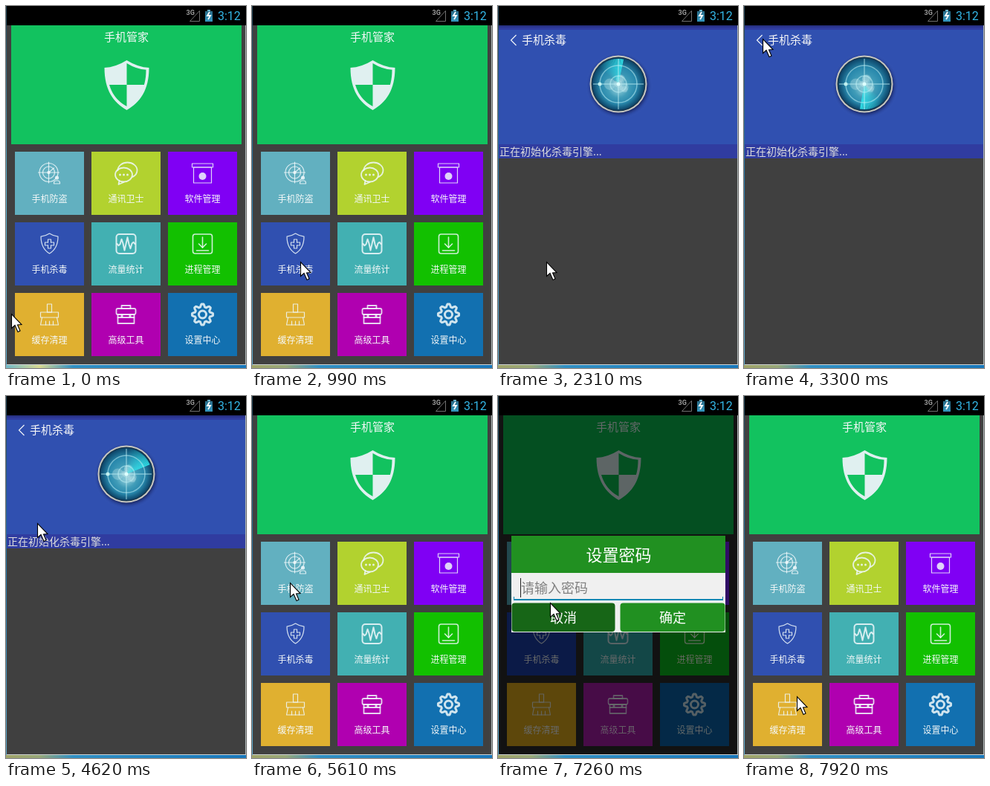
Write an HTML page with a canvas that moves like this. It is 323 px wide and 487 px high and loops after 8000 ms.

```html
<!DOCTYPE html>
<html lang="zh-CN">
<head>
<meta charset="utf-8">
<style>
html, body { margin: 0; width: 100%; height: 100%; overflow: hidden; background: #404040; }
canvas { display: block; }
</style>
</head>
<body>
<canvas id="stage" width="323" height="487"></canvas>
<script>
const c = document.getElementById('stage').getContext('2d');
const LOOP = 8000, TICK = 330, TAU = Math.PI * 2;
const CJK = '"Noto Sans CJK SC", "Noto Sans CJK", sans-serif';
const LATIN = 'Roboto, sans-serif';
const INK = 'rgba(240,248,250,.85)';
const GREEN = '#12c25f', BUTTON = '#219021';

const SCAN = 1320, SWEEP = 2310, BACK = 4950, ASK = 6600, CANCEL = 7260, CLOSE = 7590;

// The pointer rests at each stop, then glides to the next.
const STOPS = [
  { at: 0, until: 0, x: 7, y: 414 },
  { at: 660, until: SWEEP, x: 65, y: 344 },
  { at: 2970, until: 4290, x: 25, y: 44 },
  { at: 4620, until: 4620, x: 42, y: 171 },
  { at: BACK, until: BACK, x: 46, y: 251 },
  { at: 5610, until: ASK, x: 51, y: 251 },
  { at: 6930, until: CLOSE, x: 70, y: 278 },
  { at: 7920, until: LOOP, x: 71, y: 404 }
];

function seeded(seed) {
  return () => (seed = seed * 16807 % 2147483647) / 2147483647;
}

function rect(x, y, w, h, fill) {
  c.fillStyle = fill;
  c.fillRect(x, y, w, h);
}

function blend(x0, y0, x1, y1, ...colors) {
  const g = c.createLinearGradient(x0, y0, x1, y1);
  colors.forEach((color, i) => g.addColorStop(i / (colors.length - 1), color));
  return g;
}

function text(s, x, y, size, fill = '#f4f8f8', align = 'center', font = CJK, weight = 500) {
  c.font = `${weight} ${size}px ${font}`;
  c.textAlign = align;
  c.fillStyle = fill;
  c.fillText(s, x, y);
}

function trace(points, closed) {
  c.beginPath();
  for (const [x, y] of points) c.lineTo(x, y);
  if (closed) c.closePath();
}

function line(...points) {
  trace(points);
  c.stroke();
}

function ring(x, y, rx, ry = rx, from = 0, to = TAU) {
  c.beginPath();
  c.ellipse(x, y, rx, ry, 0, from, to);
  c.stroke();
}

function dot(x, y, r, fill = INK) {
  c.beginPath();
  c.arc(x, y, r, 0, TAU);
  c.fillStyle = fill;
  c.fill();
}

function frameBox(x, y, w, h, r = 0) {
  c.beginPath();
  c.roundRect(x, y, w, h, r);
  c.stroke();
}

function shield(w, h) {
  c.beginPath();
  c.moveTo(0, 0);
  c.quadraticCurveTo(w * .5, h * .14, w, h * .15);
  c.bezierCurveTo(w, h * .6, w * .6, h * .85, 0, h);
  c.bezierCurveTo(-w * .6, h * .85, -w, h * .6, -w, h * .15);
  c.quadraticCurveTo(-w * .5, h * .14, 0, 0);
  c.closePath();
}

// Icons are drawn around their own centre.
const icons = {
  target() {
    for (const r of [8, 12.5]) ring(-1, -1, r);
    line([-15, -1], [13, -1]);
    line([-1, -15], [-1, 13]);
    line([-1, -1], [6, -7]);
    dot(-1, -1, 2.2);
    dot(10, 6, 2.6);
    frameBox(6, 10, 8, 4, [3, 3, 0, 0]);
  },
  chat() {
    c.lineWidth = 1.8;
    ring(2, -4, 13, 10.5, Math.PI, TAU + 1);
    ring(-3, 2, 11.5, 9.5);
    line([-9, 10], [-10, 15], [-3, 12]);
    for (let i = -1; i <= 1; i++) dot(i * 5 - 3, 2, 1.5);
  },
  apps() {
    frameBox(-14, -13, 28, 5);
    frameBox(-12, -8, 24, 21);
    dot(0, 4, 5);
  },
  guard() {
    c.translate(0, -14);
    shield(11.5, 27);
    c.stroke();
    c.translate(0, 14);
    for (let i = 0; i < 4; i++) {
      line([-2, -2], [-2, -6], [2, -6], [2, -2]);
      c.rotate(TAU / 4);
    }
  },
  pulse() {
    c.lineWidth = 2;
    frameBox(-13, -13, 26, 26, 4);
    const beat = x => [x, -9 * Math.sin(x * .8) * Math.cos(x / 12 * TAU / 4)];
    line(...Array.from({ length: 13 }, (_, i) => beat(i * 2 - 12)));
  },
  download() {
    c.lineWidth = 1.6;
    frameBox(-13, -13, 26, 26, 3);
    line([0, -9], [0, 5]);
    line([-5, 0], [0, 5], [5, 0]);
    line([-8, 9], [8, 9]);
  },
  broom() {
    frameBox(-3, -14, 6, 11);
    frameBox(-12, -3, 24, 7);
    line([-10, 4], [-12, 14], [12, 14], [10, 4]);
    for (let x = -5; x <= 5; x += 5) line([x, 9], [x, 14]);
  },
  tools() {
    c.lineWidth = 1.8;
    frameBox(-6, -12, 12, 4);
    frameBox(-13, -8, 26, 8, 2);
    frameBox(-11, 0, 22, 12);
    line([-11, 4], [11, 4]);
    for (const x of [-7, 4]) rect(x, -1, 3, 5, INK);
  },
  gear() {
    c.lineWidth = 3;
    const tooth = (_, i) => {
      const a = i / 64 * TAU, r = 12.2 + 1.9 * Math.tanh(3 * Math.cos(8 * a));
      return [Math.cos(a) * r, Math.sin(a) * r];
    };
    trace(Array.from({ length: 64 }, tooth), true);
    c.stroke();
    ring(0, 0, 5);
  }
};

const TILES = [
  ['手机防盗', '#62b0c0', 'target'], ['通讯卫士', '#b2d22f', 'chat'], ['软件管理', '#8000f4', 'apps'],
  ['手机杀毒', '#3050b0', 'guard'], ['流量统计', '#42b0b2', 'pulse'], ['进程管理', '#12c000', 'download'],
  ['缓存清理', '#e0b030', 'broom'], ['高级工具', '#b000b0', 'tools'], ['设置中心', '#1270b0', 'gear']
];

function tile([label, color, icon], i) {
  const x = 12 + i % 3 * 103, y = 196 + Math.floor(i / 3) * 95;
  rect(x, y, 93, 85, color);
  c.save();
  c.translate(x + 46.5, y + 29);
  c.strokeStyle = INK;
  c.lineWidth = 1.2;
  c.lineJoin = c.lineCap = 'round';
  icons[icon]();
  c.restore();
  text(label, x + 46.5, y + 68, 12);
}

function desktop(t) {
  const early = t < 990;
  rect(0, 0, 323, 487, blend(0, 0, 0, 487, '#204050', early ? '#60b4d0' : '#2878a8', '#60a8c8'));
  rect(0, 483, 90, 4, blend(0, 0, 90, 0, early ? '#70b8c8' : '#a0a468', early ? '#d8d890' : '#98a878', '#3090c4'));
  rect(90, 483, 233, 4, blend(90, 0, 323, 0, '#3090c4', '#1878bc'));
  rect(1, 482, 322, 1, '#d0d4d4');
  rect(322, 26, 1, 456, '#a8b0b0');
}

function statusBar() {
  rect(1, 0, 322, 26, '#000');
  text('3G', 242.5, 12, 9, '#9c9c9c', 'left', LATIN, 700);
  c.strokeStyle = '#707070';
  c.lineWidth = 1;
  trace([[260.5, 6.5], [260.5, 20.5], [247.5, 20.5]], true);
  c.stroke();
  rect(271, 5, 4, 2, '#6ab4cc');
  rect(268, 7, 10, 14, blend(0, 7, 0, 21, '#286c88', '#3498c0'));
  c.strokeStyle = '#fff';
  c.lineWidth = 1.8;
  line([274, 8], [271, 13], [275, 13], [272, 18]);
  text('3:12', 285, 19, 16, '#33b5e5', 'left', LATIN, 400);
}

function home() {
  rect(1, 26, 321, 456, '#404040');
  rect(7, 26, 310, 160, GREEN);
  text('手机管家', 162, 47, 15);
  c.save();
  c.translate(162.5, 73);
  shield(30, 67);
  c.fillStyle = '#e0f0f0';
  c.fill();
  c.translate(0, 4);
  shield(26, 58);
  c.clip();
  rect(0, 0, 30, 29, GREEN);
  rect(-30, 29, 30, 29, GREEN);
  c.restore();
  TILES.forEach(tile);
}

function land(x, y) {
  const rnd = seeded(23);
  for (let i = 0; i < 9; i++) {
    const a = rnd() * TAU, d = rnd() * 14;
    dot(x + Math.cos(a) * d, y + Math.sin(a) * d, 3 + rnd() * 5, 'rgba(180,222,228,.38)');
  }
}

function radar(t) {
  const x = 162, y = 105;
  c.save();
  c.shadowColor = 'rgba(10,10,50,.7)';
  c.shadowBlur = 5;
  c.shadowOffsetX = 1;
  c.shadowOffsetY = 2;
  dot(x, y, 38.5, '#c8c8c0');
  c.restore();
  dot(x, y, 36.5, '#183850');
  const glass = c.createRadialGradient(x, y + 6, 4, x, y, 35);
  ['#80c4d4', '#409cb8', '#2888ac', '#0c4468'].forEach((color, i) => glass.addColorStop(i / 3, color));
  dot(x, y, 35, glass);
  land(x, y);

  // One turn takes two seconds; the sweep waits until scanning begins.
  const turn = t < SWEEP ? -45 : 12 + (t - SWEEP) * .18;
  const lead = (turn - 90) * TAU / 360, steps = 24, span = 1.05;
  for (let i = 0; i < steps; i++) {
    const a = lead - i / steps * span;
    c.fillStyle = `rgba(50,235,240,${.9 * (1 - i / steps)})`;
    c.beginPath();
    c.moveTo(x, y);
    c.arc(x, y, 34, a - span / steps, a);
    c.fill();
  }
  c.strokeStyle = 'rgba(190,238,244,.55)';
  c.lineWidth = 1.5;
  for (const r of [11, 25]) ring(x, y, r);
  line([x - 34, y], [x + 34, y]);
  line([x, y - 34], [x, y + 34]);
  dot(x, y, 2.5, '#dff');
  dot(x - 25, y, 2.5, '#c0f0f0');
}

function scan(t) {
  rect(1, 26, 321, 456, '#404040');
  rect(1, 26, 321, 179, '#303ca0');
  rect(1, 32, 321, 154, '#3050b0');
  rect(1, 26, 321, 4, blend(0, 26, 0, 30, 'rgba(0,0,0,.25)', 'rgba(0,0,0,0)'));
  c.strokeStyle = '#f0f4f8';
  c.lineWidth = 1.2;
  line([24.5, 39], [17.5, 46], [24.5, 53]);
  text('手机杀毒', 32, 51, 15, '#f8f8f8', 'left');
  text('正在初始化杀毒引擎...', 2, 201, 14, '#dcdcdc', 'left');
  radar(t);
}

// Darkens the window and deepens its shadows.
function dim() {
  rect(1, 26, 321, 456, 'rgba(0,0,0,.53)');
  c.save();
  c.globalCompositeOperation = 'difference';
  rect(1, 26, 321, 456, '#0c0c0c');
  c.restore();
}

function button(label, x, w, fill) {
  c.beginPath();
  c.roundRect(x, 278.5, w, 38.5, 4);
  c.fillStyle = fill;
  c.fill();
  text(label, x + w / 2, 305, 18, '#fff');
}

function dialog(t) {
  dim();
  rect(18, 188, 288, 130, '#f0f0f0');
  rect(18, 188, 288, 50, BUTTON);
  text('设置密码', 162.5, 222, 22, '#fff');
  text('请输入密码', 31, 265, 18, '#808080', 'left');
  rect(21, 273, 282, 2, '#1088b4');
  for (const x of [21, 302]) rect(x, 270, 1, 4, '#1088b4');
  const blink = Math.floor((t - ASK) / TICK) % 2;
  if (!blink) rect(30, 245, 1, 26, '#202020');
  button('取消', 18.5, 139, t >= CANCEL ? '#176617' : BUTTON);
  button('确定', 164.5, 141, BUTTON);
}

function pointer(t) {
  const i = STOPS.findLastIndex(s => s.at <= t);
  const a = STOPS[i], b = STOPS[i + 1] || a;
  const u = t > a.until ? (t - a.until) / (b.at - a.until) : 0;
  c.save();
  c.translate(a.x + (b.x - a.x) * u + .5, a.y + (b.y - a.y) * u + .5);
  trace([[0, 0], [0, 19], [4.5, 15], [8.5, 24], [11.5, 22.5], [8, 14.5], [13.5, 14]], true);
  c.fillStyle = '#fff';
  c.fill();
  c.strokeStyle = '#000';
  c.lineWidth = 1.1;
  c.stroke();
  c.restore();
}

function draw(now) {
  const t = Math.floor(now % LOOP / TICK) * TICK;
  desktop(t);
  statusBar();
  if (t >= SCAN && t < BACK) scan(t);
  else home();
  if (t >= ASK && t < CLOSE) dialog(t);
  pointer(t);
}

const start = performance.now();
function frame() {
  draw(performance.now() - start);
  requestAnimationFrame(frame);
}
frame();
</script>
</body>
</html>
```
